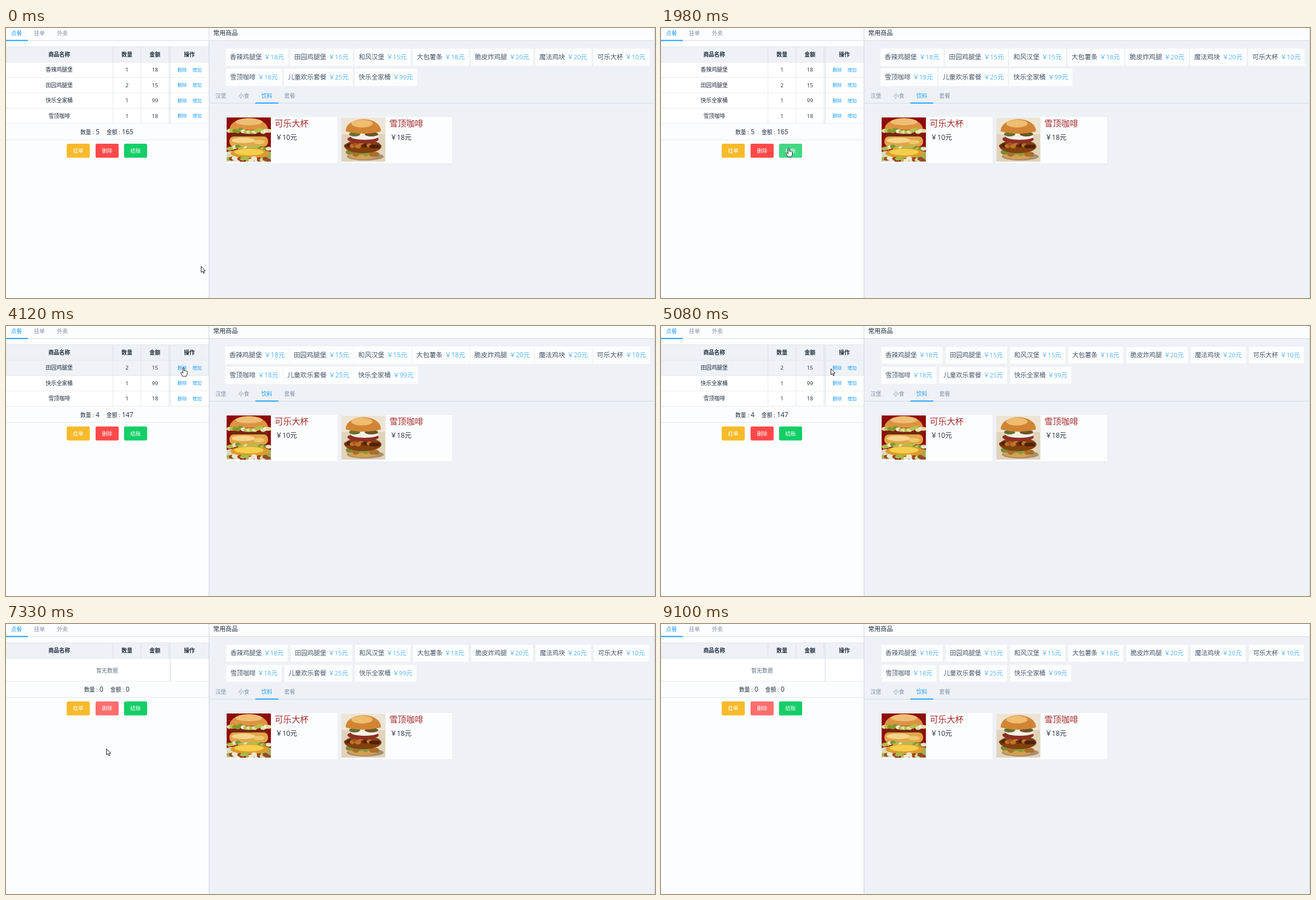
These frames come from a looping animation (1159x483 px, 9200 ms). An HTML page:

```html
<!DOCTYPE html>
<html lang="zh-CN">
<head>
<meta charset="utf-8">
<style>
html, body { margin: 0; width: 100%; height: 100%; overflow: hidden; background: #eef1f6; }
svg { display: block; }
text { font-family: "Open Sans", "Noto Sans CJK SC", "Noto Sans CJK", sans-serif; font-size: 9.7px; fill: #1f2d3d; white-space: pre; }
.mid { text-anchor: middle; }
.end { text-anchor: end; }
.bold { font-weight: 700; }
.grey { fill: #8391a5; }
.blue { fill: #20a0ff; }
.link { fill: #20a0ff; font-size: 8.4px; }
.white { fill: #fff; font-size: 9.4px; font-weight: 500; }
.head { font-size: 11px; }
.name { font-size: 11.2px; fill: #475669; }
.price { font-size: 11.2px; font-weight: 500; fill: #58b7ff; }
.title { font-size: 15.2px; fill: #a52a2a; }
.cost { font-size: 12.2px; }
.none { fill: #5e7382; }
.big { font-size: 11.8px; }
.tag { transform-box: fill-box; transform-origin: center; }
</style>
</head>
<body>
<svg id="stage" width="1159" height="483" viewBox="0 0 1159 483"></svg>
<script>
const LOOP = 9200, ROW = 27.4, TOP = 61.3, PAPER = '#fcfdfe', LINE = '#dfe6ec';

const rect = (x, y, w, h, fill, more = '') =>
  `<rect x="${x}" y="${y}" width="${w}" height="${h}" fill="${fill}" ${more}/>`;
const text = (x, y, s, cls = '') => `<text x="${x}" y="${y}" class="${cls}">${s}</text>`;
const oval = (x, y, rx, ry, fill) => `<ellipse cx="${x}" cy="${y}" rx="${rx}" ry="${ry}" fill="${fill}"/>`;
const path = (d, fill, more = '') => `<path d="${d}" fill="${fill}" ${more}/>`;

// frilly strip of small blobs
function frill(x, y, w, r, colors, seed) {
  let out = '';
  for (let i = 0; i * r < w; i++) {
    seed = (seed * 16807) % 2147483647;
    out += oval(x + i * r, y + seed % 5 - 2, r, r * .7, colors[seed % colors.length]);
  }
  return out;
}

const goods = [
  ['香辣鸡腿堡', 18], ['田园鸡腿堡', 15], ['和风汉堡', 15], ['大包薯条', 18], ['脆皮炸鸡腿', 20],
  ['魔法鸡块', 20], ['可乐大杯', 10], ['雪顶咖啡', 18], ['儿童欢乐套餐', 25], ['快乐全家桶', 99]
];

function tags() {
  let x = 393.7, y = 37.3, out = '';
  goods.forEach(([name, price], i) => {
    if (i === 7) { x = 393.7; y = 73.3; }
    const w = 53.2 + name.length * 11.2;
    out += `<g class="tag">${rect(x, y, w, 30, PAPER)}${text(x + 7.2, y + 18.9, name, 'name')}` +
      `${text(x + w - 7.2, y + 18.9, `￥${price}元`, 'price end')}</g>`;
    x += w + 5.8;
  });
  return out;
}

const stackedBurger = rect(0, 0, 79, 79, '#8f0b0b') +
  oval(9, 70, 16, 10, '#ded9be') + oval(72, 70, 12, 10, '#a3ab55') +
  path('M5 22C7-6 72-6 74 22Z', '#dc9440') + oval(40, 8, 24, 6, '#efbd75') +
  frill(5, 24, 71, 5, ['#b4c04c', '#dfe0a0', '#f0ecd2', '#7f9a30'], 11) +
  rect(7, 30, 66, 7, '#6f2a12', 'rx="3"') +
  rect(5, 34, 69, 18, '#e2a547', 'rx="8"') + oval(30, 41, 21, 5, '#f5d48c') + oval(58, 44, 10, 4, '#f0c66c') +
  frill(5, 54, 71, 5, ['#e6e6c0', '#b1bd4e', '#7c9a34'], 7) +
  oval(41, 64, 34, 9, '#dd9c2c') + oval(40, 62, 26, 6, '#f7cd4c') +
  frill(4, 75, 74, 5, ['#ece8d0', '#a8b84a', '#9a4a28', '#d8dc9c'], 23);

const friedBurger = rect(0, 0, 79, 79, '#e0d3bb') + rect(0, 0, 79, 30, '#ece5d6') +
  oval(43, 70, 33, 7, '#a98f6e') + oval(39, 66, 28, 9, '#d79f52') +
  frill(14, 64, 52, 6, ['#8c9a3e', '#a8702a', '#7d8a3a'], 5) +
  oval(39, 52, 33, 12, '#83400f') +
  frill(10, 51, 60, 5, ['#a9581c', '#6f2f0c', '#c0732a', '#4f210a'], 31) +
  oval(39, 39, 28, 7, '#8f2e26') + oval(42, 34, 25, 6, '#f5f0e6') +
  oval(24, 30, 10, 4, '#66702f') + oval(54, 30, 12, 4, '#6b5428') +
  path('M8 25C8-4 71-4 71 25Q40 33 8 25Z', '#d18534') + oval(37, 11, 19, 7, '#efbc70');

const card = (x, name, price, pic) =>
  rect(x, 158.3, 200, 84.3, PAPER, 'stroke="#e5e9f2" stroke-width=".7"') +
  `<svg x="${x + 1.2}" y="160" width="79" height="79">${pic}</svg>` +
  text(x + 87, 175.8, name, 'title') + text(x + 88.5, 199.5, `￥${price}元`, 'cost');

const orders = [['香辣鸡腿堡', 1, 18], ['田园鸡腿堡', 2, 15], ['快乐全家桶', 1, 99], ['雪顶咖啡', 1, 18]];
const buttons = [
  [108.4, '挂单', '#f7ba2a', '#f9c855'],
  [160, '删除', '#ff4949', '#ff6d6d'],
  [210.8, '结账', '#13ce66', '#42d885']
];

const header = rect(0, 33.5, 362, 27.8, '#eef1f6') + rect(0, 33.2, 362, .8, LINE) + rect(0, 60.8, 362, .8, LINE) +
  [['商品名称', 95], ['数量', 216], ['金额', 266], ['操作', 327.5]]
    .map(([s, x]) => text(x, 51, s, 'mid bold')).join('');

const total = (label, n) => `${label}<tspan dx="2.4">:</tspan><tspan dx="3.2" class="big">${n}</tspan>`;

function order(list, hoverRow, hoverBtn, focused) {
  const bodyH = list.length ? list.length * ROW : 41, bottom = TOP + bodyH;
  let out = rect(0, TOP, 362, bodyH, '#fff');
  list.forEach(([name, count, price], i) => {
    const y = TOP + i * ROW, base = y + 17;
    if (i === hoverRow) out += rect(0, y, 362, ROW, '#eff2f7');
    out += rect(0, y + ROW - .5, 362, .8, LINE) + text(95, base, name, 'mid') +
      text(216, base, count, 'mid') + text(266, base, price, 'mid') +
      text(314.5, base - .5, '删除', 'link mid') + text(341, base - .5, '增加', 'link mid');
  });
  if (!list.length) out += rect(0, bottom - .5, 362, .8, LINE) + text(180.5, 86.5, '暂无数据', 'mid none');
  else out += [190.6, 240.6, 290.4].map(x => rect(x, TOP, .9, bodyH, LINE)).join('');
  out += rect(292.6, TOP, 1.1, bodyH, '#d3dbe4');

  const count = list.reduce((s, o) => s + o[1], 0), sum = list.reduce((s, o) => s + o[1] * o[2], 0);
  out += text(180, bottom + 19, `${total('数量', count)}<tspan dx="12.5">${total('金额', sum)}</tspan>`, 'mid') +
    rect(0, bottom + 28.7, 362, .9, LINE);
  buttons.forEach(([x, s, color, light], i) => {
    out += rect(x, bottom + 36.2, 41.2, 25, i === hoverBtn || i === focused ? light : color, 'rx="2.6"') +
      text(x + 20.6, bottom + 52, s, 'white mid');
  });
  return out;
}

const tabs = (list, y) => list.map(([s, x, cls]) => text(x, y, s, cls || 'grey')).join('');

const outline = 'stroke="#222" stroke-width="1" stroke-linejoin="round"';
document.getElementById('stage').innerHTML =
  rect(0, 0, 362, 483, PAPER) + rect(362, 0, 797, 483, '#eef1f6') +
  rect(0, 22, 362, .9, '#d1dbe5') + rect(0, 21.4, 39, 2, '#20a0ff') +
  tabs([['点餐', 9, 'blue'], ['挂单', 50], ['外卖', 91]], 12.5) +
  '<g id="order"></g>' + header +
  [190.6, 240.6, 290.4, 292.6].map(x => rect(x, 33.5, 1, 27.8, '#d9e0e8')).join('') +
  rect(362, 0, 1, 483, '#cdd6e0') +
  rect(363, 0, 796, 22, PAPER) + rect(363, 22, 796, 1, '#d3dce6') + text(370, 13, '常用商品', 'head') +
  tags() +
  rect(363, 134, 796, .9, '#d1dbe5') + rect(445.3, 133.3, 41, 2, '#20a0ff') +
  tabs([['汉堡', 374], ['小食', 415], ['饮料', 456, 'blue'], ['套餐', 497]], 124.5) +
  card(392.8, '可乐大杯', 10, stackedBurger) + card(597.4, '雪顶咖啡', 18, friedBurger) +
  rect(1158, 0, 1, 483, '#ccd3dc') +
  '<g id="cursor">' +
  path('M.5 .5V11.2L3 9L4.7 12.9L6.4 12.2L4.8 8.4H8Z', '#fff', outline) +
  path('M-1 1Q0-.6 1.2 1V6Q2.4 5 3.4 6.4Q4.6 5.6 5.4 7Q6.6 6.6 6.6 8.4V12L5 16H-1.6L-4.6 10.4Q-4.6 8.4-3 8.6L-1 10.4Z', '#fff', outline) +
  '</g>';

const orderBox = document.getElementById('order'), cursor = document.getElementById('cursor');
const [arrow, hand] = cursor.children, tagBoxes = document.querySelectorAll('.tag');

// cursor stops: time, x, y
const route = [
  [0, 348, 426], [255, 346, 434], [700, 330, 300], [960, 290, 130], [1080, 215, 115], [1300, 125, 190],
  [1450, 130, 217], [1700, 182, 217], [1875, 228, 214.5], [2020, 228, 214.5], [2140, 250, 150],
  [2400, 230, 125], [2800, 290, 110], [3200, 315, 77], [3460, 317, 74], [4270, 317, 74], [4600, 290, 82],
  [5095, 303, 76], [5500, 311, 75], [5730, 311, 75], [6055, 250, 226], [6480, 249, 228], [6800, 185, 168],
  [7080, 180, 160], [7304, 179, 223], [7600, 218, 238], [8000, 232, 330], [8500, 265, 500], [LOOP, 265, 500]
];

// the picture advances in eight steps between these moments
const beats = [120, 1200, 2280, 3340, 4420, 5500, 6610, 7720, 8830, 9910], LEAD = 35;
function snap(t) {
  if (t < beats[0]) return 0;
  const i = beats.findIndex((b, k) => t < beats[k + 1]);
  const step = (beats[i + 1] - beats[i]) / 8;
  return Math.min(9100, beats[i] + Math.floor((t + LEAD - beats[i]) / step) * step);
}

function locate(t) {
  const i = Math.max(1, route.findIndex(p => p[0] > t));
  const [t0, x0, y0] = route[i - 1], [t1, x1, y1] = route[i], f = (t - t0) / (t1 - t0);
  return [x0 + (x1 - x0) * f, y0 + (y1 - y0) * f];
}

let shown = '';
function draw(now) {
  const t = snap(now % LOOP), [x, y] = locate(t);
  const removed = t < 3900 ? 0 : t < 5700 ? 1 : t < 7050 ? 2 : 4;
  const list = orders.slice(removed), bottom = TOP + (list.length ? list.length * ROW : 41);

  const slot = Math.floor((y - TOP) / ROW), row = slot >= 0 && slot < list.length && x < 362 ? slot : -1;
  const btn = y > bottom + 36 && y < bottom + 61 ? buttons.findIndex(b => x > b[0] && x < b[0] + 41) : -1;
  const inRow = (y - TOP) % ROW;
  const onLink = row >= 0 && inRow > 8 && inRow < 22 && (x > 306 && x < 323 || x > 332 && x < 350);

  const key = [removed, row, btn].join();
  if (key !== shown) {
    shown = key;
    orderBox.innerHTML = order(list, row, btn, removed === 4 ? 1 : -1);
  }
  const pointing = onLink || btn >= 0;
  arrow.style.display = pointing ? 'none' : '';
  hand.style.display = pointing ? '' : 'none';
  cursor.setAttribute('transform', `translate(${x} ${y})`);

  const scale = 1.025 + .025 * Math.cos((t - 490) / 950 * Math.PI);
  tagBoxes.forEach(g => g.style.transform = `scale(${scale})`);
}

const start = performance.now();
(function tick() {
  draw(performance.now() - start);
  requestAnimationFrame(tick);
})();
</script>
</body>
</html>
```
